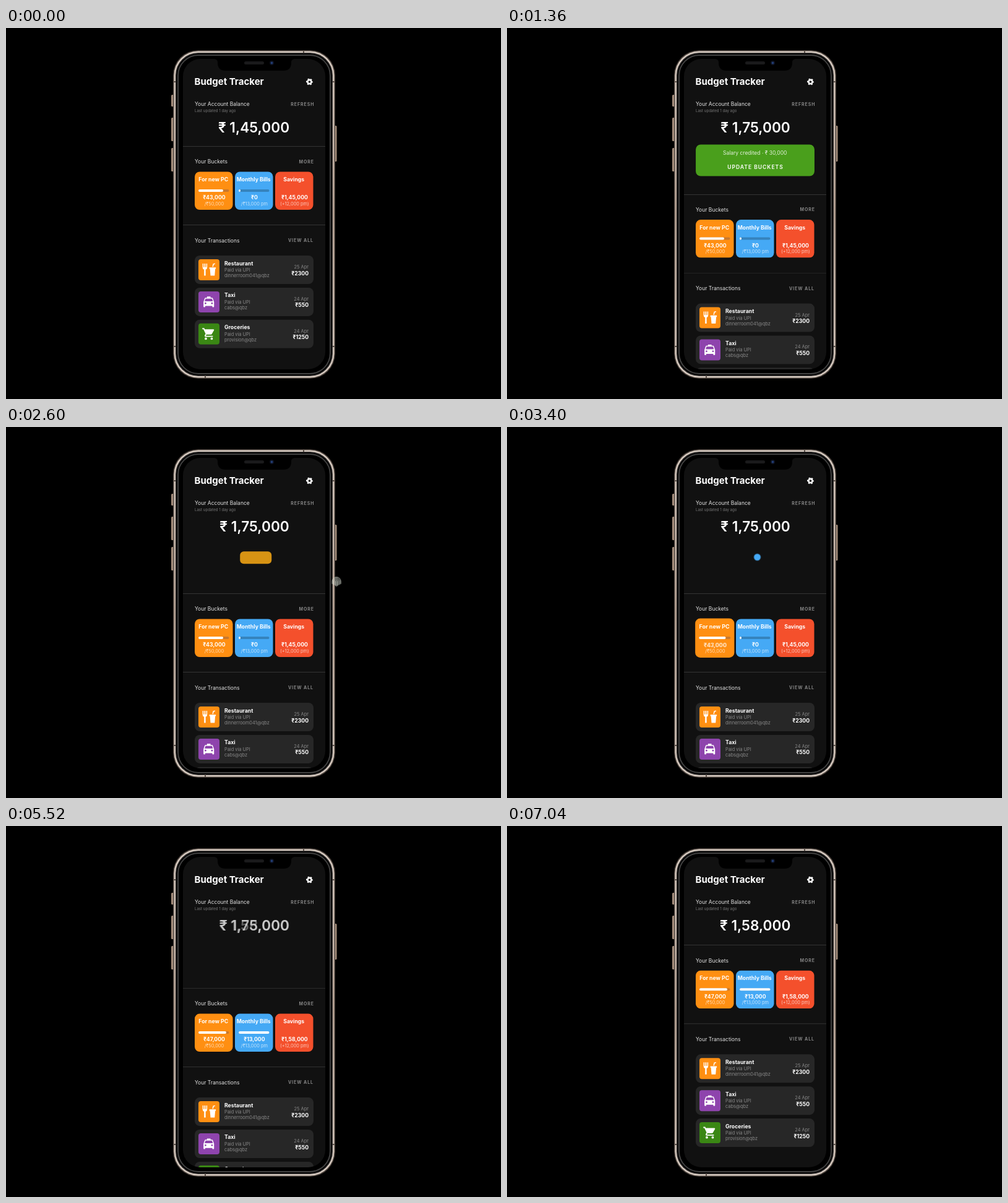
Write an HTML page that moves like this. It is 800 px wide and 600 px high and loops after 7720 ms.

```html
<!DOCTYPE html>
<html lang="en">
<head>
<meta charset="utf-8">
<title>Budget Tracker</title>
<style>
  html, body { margin: 0; width: 100%; height: 100%; overflow: hidden; background: #000; }
  svg { display: block; width: 800px; height: 600px; font-family: Inter, sans-serif; }
  text { fill: #fff; white-space: pre; }
  .mid { text-anchor: middle; }
  .end { text-anchor: end; }
  .label { font-size: 8.5px; fill: #e2e2e2; }
  .link { font-size: 7px; font-weight: 700; letter-spacing: .95px; fill: #858585; }
  .bold { font-size: 8.7px; font-weight: 700; }
  .note { font-size: 7.4px; fill: #888; }
  .sub { font-size: 7.4px; fill-opacity: .68; }
  .balance { font-size: 22.7px; font-weight: 600; }
  .rule { stroke: #343434; }
  .card { transform-box: fill-box; transform-origin: center; }
  .anim { animation: 7.72s linear infinite; }
</style>
</head>
<body>
<svg viewBox="0 0 800 600">
  <defs>
    <clipPath id="screen"><rect x="286" y="50" width="230" height="502" rx="28"/></clipPath>
    <linearGradient id="metal" x1="0" y1="0" x2="0" y2="1">
      <stop offset="0" stop-color="#d9cdc3"/>
      <stop offset=".5" stop-color="#b9a596"/>
      <stop offset="1" stop-color="#d9cdc3"/>
    </linearGradient>
  </defs>

  <g fill="#a48d7b">
    <rect x="267" y="108" width="5" height="19" rx="1.5"/>
    <rect x="267" y="145" width="5" height="38" rx="1.5"/>
    <rect x="267" y="194" width="5" height="38" rx="1.5"/>
    <rect x="530" y="158" width="4.500" height="58" rx="1.5"/>
  </g>
  <rect x="270" y="36" width="262" height="531" rx="40.500" fill="#4f4640"/>
  <rect x="271.500" y="37.500" width="259" height="528" rx="39" fill="url(#metal)"/>
  <rect x="274" y="40" width="254" height="523" rx="36.500" fill="#2c2a2a"/>
  <rect x="275.500" y="41.500" width="251" height="520" rx="35"/>
  <rect x="278" y="44" width="246" height="515" rx="33" fill="none" stroke="#414141" stroke-width="2"/>
  <path d="M270 87h4M270 515h4M528 87h4M528 515h4M481 36v4M322 562v4" stroke="#5a5049" stroke-width="2"/>
  <rect x="286" y="50" width="230" height="502" rx="28" fill="#111"/>

  <g clip-path="url(#screen)">
    <text x="304.5" y="92" font-size="15" font-weight="700">Budget Tracker</text>
    <g fill="none" stroke="#fff" transform="translate(490.5 87)">
      <circle r="3.1" stroke-width="2.6"/>
      <circle r="4.6" stroke-width="1.8" stroke-dasharray="2.4 2.417" stroke-dashoffset="1.2"/>
    </g>
    <text class="label" x="305" y="126">Your Account Balance</text>
    <text x="305" y="135.5" font-size="6.1" style="fill:#777">Last updated 1 day ago</text>
    <text class="link end" x="498.5" y="125.7">REFRESH</text>
    <text class="balance mid anim" style="animation-name:bal1" x="400.5" y="169">₹ 1,45,000</text>
    <text class="balance mid anim" style="animation-name:bal2" x="401.6" y="169">₹ 1,75,000</text>
    <text class="balance mid anim" style="animation-name:bal3" x="401.2" y="169">₹ 1,58,000</text>

    <g class="anim" style="animation-name:shift">
      <path class="rule anim" style="animation-name:rule" d="M286 191.5H516"/>
      <text class="label" x="305" y="219.3">Your Buckets</text>
      <text class="link end" x="498" y="218.8">MORE</text>
      <g id="buckets"></g>
      <path class="rule" d="M286 318.5H516"/>
      <text class="label" x="305" y="346.5">Your Transactions</text>
      <text class="link end" x="497" y="346">VIEW ALL</text>
      <g id="rows"></g>
    </g>

    <rect class="anim" style="animation-name:morph, bannerIn"/>
    <g class="anim" style="animation-name:bannerText">
      <text class="mid" x="400.7" y="205" font-size="8.5" fill-opacity=".85">Salary credited · ₹ 30,000</text>
      <text class="mid" x="401.5" y="227.5" font-size="8.5" font-weight="700" letter-spacing="1" fill-opacity=".9">UPDATE BUCKETS</text>
    </g>
    <circle class="anim" style="animation-name:dot2" r="5.5" fill="#45a9f5"/>
    <circle class="anim" style="animation-name:dot3" r="5.5" fill="#f4502c"/>
  </g>

  <path d="M337 50q5 1 5 5v1q0 13 13 13h93q13 0 13-13v-1q0-4 5-5z"/>
  <rect x="385" y="54" width="32" height="5" rx="2.5" fill="#1a1a1b"/>
  <circle cx="429.5" cy="56.5" r="3.4" fill="#101627"/>
  <circle cx="429.5" cy="56.5" r="1.7" fill="#23407c"/>

  <g class="anim" style="animation-name:finger, fingerFade" fill="none" stroke="#d8dfd4" stroke-width=".9" stroke-linecap="round" id="finger"></g>
</svg>

<script>
  const LOOP = 7720;
  const OUT = ';animation-timing-function:cubic-bezier(.16,1,.3,1)';
  const INOUT = ';animation-timing-function:cubic-bezier(.4,0,.2,1)';
  const IN = ';animation-timing-function:cubic-bezier(.5,0,.9,.6)';
  const css = [];
  const $ = id => document.getElementById(id);

  // Each stop is [time in ms, declaration]; the first and last are held.
  function keys(name, prop, stops) {
    const all = [[0, stops[0][1]], ...stops, [LOOP, stops[stops.length - 1][1]]];
    const body = all.map(([t, v]) => `${(t / LOOP * 100).toFixed(3)}%{${prop && prop + ':'}${v}}`);
    css.push(`@keyframes ${name}{${body.join('')}}`);
  }
  const fade = (name, ...stops) => keys(name, 'opacity', stops);
  const move = (name, ...stops) => keys(name, 'transform', stops);
  const at = (x, y, s = 1) => `translate(${x}px,${y}px) scale(${s})`;

  move('shift', [720, at(0, 0) + OUT], [1670, at(0, 78)], [5440, at(0, 78) + INOUT],
    [5920, at(0, -.7) + INOUT], [7040, at(0, 1.3)]);
  fade('rule', [5480, 1], [5640, 0], [6240, 0], [6400, 1]);
  fade('bal1', [740, 1], [970, 0]);
  fade('bal2', [740, 0], [970, 1], [5440, 1], [5680, 0]);
  fade('bal3', [5440, 0], [5680, 1]);

  const box = (x, y, w, h, r, c) => `x:${x}px;y:${y}px;width:${w}px;height:${h}px;rx:${r}px;fill:${c}`;
  const full = box(305, 188.5, 192, 51, 8, '#4a9f1c');
  const ball = (x, y, r = 5.5) => box(x - r, y - r, 2 * r, 2 * r, r, '#ff8f12');
  keys('morph', '', [[1000, box(321, 193, 160, 42, 8, '#4a9f1c') + OUT], [1500, full],
    [2400, full + INOUT], [2800, ball(404.5, 210.5)], [3000, ball(404.5, 210.5) + IN], [3320, ball(335.5, 341)]]);
  fade('bannerIn', [1000, 0], [1240, 1], [3320, 1], [3321, 0]);
  fade('bannerText', [1080, 0], [1360, 1], [2360, 1], [2500, 0]);

  function drop(name, hit, x) {
    const rest = at(404.5, 210.5);
    move(name, [hit - 780, at(404.5, 210.5, 0) + OUT], [hit - 700, rest], [hit - 320, rest + IN],
      [hit, at(x, 341)], [hit + 1, at(x, 341, 0)]);
  }
  drop('dot2', 4030, 400.5);
  drop('dot3', 4735, 468);

  move('finger', [1560, at(546, 255) + INOUT], [2000, at(449, 211)], [2180, at(449, 211)],
    [2260, at(449, 211, .82)], [2360, at(449, 211) + INOUT], [2760, at(546, 255)]);
  fade('fingerFade', [1560, 0], [1680, 1], [2600, 1], [2760, 0]);

  // Buckets
  const buckets = [
    { x: 305, color: '#ff8f12', title: 'For new PC', from: '₹43,000', to: '₹47,000', sub: '/₹50,000', hit: 3320, bar: [40, 45], track: '#c9782c' },
    { x: 370, color: '#45a9f5', title: 'Monthly Bills', from: '₹0', to: '₹13,000', sub: '/₹13,000 pm', hit: 4030, bar: [3, 49.5], track: '#3583bd' },
    { x: 435, color: '#f4502c', title: 'Savings', from: '₹1,45,000', to: '₹1,58,000', sub: '(+12,000 pm)', hit: 4735 },
  ];
  $('buckets').innerHTML = buckets.map((b, i) => {
    const c = b.x + 30.7;
    move('pulse' + i, [b.hit, 'scale(1)'], [b.hit + 80, 'scale(1.03)'], [b.hit + 280, 'scale(1)']);
    fade('old' + i, [b.hit, 1], [b.hit + 200, 0]);
    fade('new' + i, [b.hit, 0], [b.hit + 200, 1]);
    let bar = '';
    if (b.bar) {
      keys('bar' + i, 'width', [[b.hit, b.bar[0] + 'px'], [b.hit + 200, b.bar[1] + 'px']]);
      bar = `<rect x="${b.x + 6}" y="261" width="49.5" height="4" rx="2" fill="${b.track}"/>
        <rect class="anim" style="animation-name:bar${i}" x="${b.x + 6}" y="261" height="4" rx="2" fill="#fff"/>`;
    }
    return `<g class="card anim" style="animation-name:pulse${i}">
      <rect x="${b.x}" y="232.5" width="61.5" height="61.5" rx="8" fill="${b.color}"/>
      <text class="bold mid" x="${c - .5}" y="248">${b.title}</text>${bar}
      <text class="bold mid anim" style="animation-name:old${i}" x="${c + .7}" y="277.4">${b.from}</text>
      <text class="bold mid anim" style="animation-name:new${i}" x="${c + .7}" y="277.4">${b.to}</text>
      <text class="sub mid" x="${c + .7}" y="286.6">${b.sub}</text></g>`;
  }).join('');

  // Transactions; icons sit on a 24 unit grid
  const food = 'M1.5 1.5v6.5q0 3 2.6 3.6V22h2.6V11.6q2.6-.6 2.6-3.6V1.5H7.8v6H6.3v-6H4.5v6H3v-6zM13 8h11v2.5h-1L22 22h-7l-1-11.5h-1zM18 7l1.2-5.2 3.3-.8.4 1.5-2.4.6L19.6 7z';
  const taxi = 'M18.9 6C18.7 5.4 18.2 5 17.5 5H15V3H9v2H6.5C5.8 5 5.3 5.4 5.1 6L3 12v8q0 1 1 1h1q1 0 1-1v-1h12v1q0 1 1 1h1q1 0 1-1v-8zM6.5 16a1.5 1.5 0 1 1 0-3 1.5 1.5 0 0 1 0 3zm11 0a1.5 1.5 0 1 1 0-3 1.5 1.5 0 0 1 0 3zM5 11l1.5-4.5h11L19 11z';
  const cart = 'M7 18a2 2 0 1 0 0 4 2 2 0 0 0 0-4zM1 2v2h2l3.6 7.6L5.2 14q-.2.4-.2 1 0 2 2 2h12v-2H7.4q-.4-.2-.2-.4l.9-1.6h7.5q1.2 0 1.7-1L20.9 5.5Q21.4 4.2 20 4H5.2l-.9-2zM17 18a2 2 0 1 0 0 4 2 2 0 0 0 0-4z';
  const rows = [
    ['Restaurant', 'dinnerroom041@qbz', '25 Apr', '₹2300', '#ff8f12', food],
    ['Taxi', 'cabs@qbz', '24 Apr', '₹550', '#8e44ad', taxi],
    ['Groceries', 'provision@qbz', '24 Apr', '₹1250', '#3a8714', cart],
  ];
  $('rows').innerHTML = rows.map(([name, payee, date, sum, color, icon], i) => `
    <g transform="translate(0 ${i * 51.9})">
      <rect x="305" y="368" width="192" height="46" rx="8" fill="#272727"/>
      <rect x="311" y="374" width="34" height="34" rx="4" fill="${color}"/>
      <path d="${icon}" fill="#fff" transform="translate(316.3 379.6) scale(.95)"/>
      <text class="bold" x="353" y="383.5">${name}</text>
      <text class="note" x="353" y="394">Paid via UPI</text>
      <text class="note" x="353" y="403">${payee}</text>
      <text class="note end" x="489" y="389">${date}</text>
      <text class="bold end" x="489" y="399.6">${sum}</text>
    </g>`).join('');

  // Fingerprint: nested arches
  $('finger').innerHTML = [1.5, 3.3, 5.1, 6.9].map(r =>
    `<path d="M${-r} ${7.6 - r * .55}V0a${r} ${r} 0 0 1 ${2 * r} 0V${7.6 - r * .55}"/>`).join('') + '<path d="M0 0V8"/>';

  const sheet = document.createElement('style');
  sheet.textContent = css.join('\n');
  document.head.append(sheet);
</script>
</body>
</html>
```
